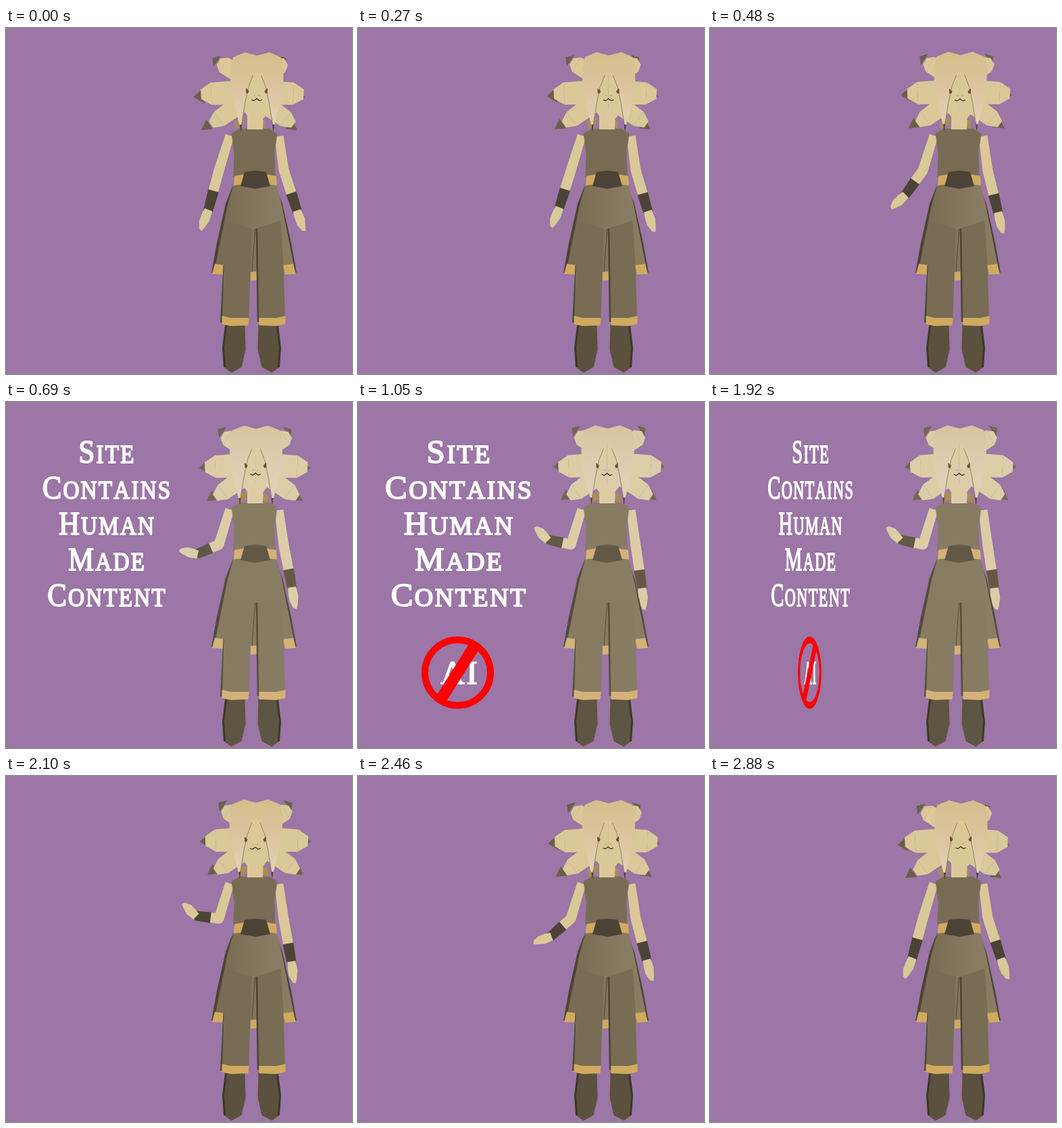
These frames come from a looping animation (512 by 512 pixels, 2910 ms). An HTML page with a canvas:

```html
<!DOCTYPE html>
<html lang="en">
<head>
<meta charset="utf-8">
<title>Human made</title>
<style>
html, body { margin: 0; width: 100%; height: 100%; overflow: hidden; background: #9b76a6; }
canvas { display: block; width: 100vw; height: 100vh; }
</style>
</head>
<body>
<canvas id="stage" width="512" height="512"></canvas>
<script>
const ctx = document.getElementById('stage').getContext('2d');
const LOOP = 2910, STEP = 30, HOLD = [1050, 1800];
const FONT = '"Liberation Serif", "Times New Roman", serif';
const RAD = Math.PI / 180;

// Colours turn softer while the text is on stage
const RICH = {
  skin: '#dac898', tip: '#6b5f49', dark: '#4b4436', gold: '#cfaa5f', edge: '#4d4435',
  boot: '#5b513e', cloth: ['#796c54', '#8a7c62'], hair: ['#d5bf8c', '#dcc49f', '#e3d0b2']
};
const SOFT = {
  skin: '#dccda7', tip: '#71664f', dark: '#625945', gold: '#d3b376', edge: '#544b3b',
  boot: '#5e5643', cloth: ['#877b62', '#897d64'], hair: ['#d6c5a0', '#dfccae', '#e2d0b7']
};
let tone = RICH;

const ease = x => { x = Math.min(1, Math.max(0, x)); return x * x * (3 - 2 * x); };
const ramp = (t, a, b) => ease((t - a) / (b - a));
const pulse = (t, a, b, c, d) => ramp(t, a, b) - ramp(t, c, d);

function trace(p) {
  ctx.beginPath();
  for (let i = 0; i < p.length; i += 2) ctx.lineTo(p[i], p[i + 1]);
}

function poly(fill, ...p) {
  trace(p);
  ctx.fillStyle = fill;
  ctx.fill();
}

function line(color, width, ...p) {
  trace(p);
  ctx.strokeStyle = color;
  ctx.lineWidth = width;
  ctx.stroke();
}

function disc(fill, x, y, r) {
  ctx.beginPath();
  ctx.arc(x, y, r, 0, 2 * Math.PI);
  ctx.fillStyle = fill;
  ctx.fill();
}

function blend(x0, y0, x1, y1, colors) {
  const g = ctx.createLinearGradient(x0, y0, x1, y1);
  colors.forEach((c, i) => g.addColorStop(i / (colors.length - 1), c));
  return g;
}

function at(x, y, turn, draw) {
  ctx.save();
  ctx.translate(x, y);
  ctx.rotate(turn);
  draw();
  ctx.restore();
}

// Draws a half shape on both sides of an axis; x counts outward
function both(axis, dy, draw) {
  for (const side of [-1, 1]) {
    ctx.save();
    ctx.translate(axis, dy);
    ctx.scale(side, 1);
    draw();
    ctx.restore();
  }
}

// Strip from one point to another with a width at each end
function taper(fill, x0, y0, w0, x1, y1, w1) {
  const d = Math.hypot(x1 - x0, y1 - y0) * 2;
  const nx = (y0 - y1) / d, ny = (x1 - x0) / d;
  poly(fill, x0 + nx * w0, y0 + ny * w0, x1 + nx * w1, y1 + ny * w1,
    x1 - nx * w1, y1 - ny * w1, x0 - nx * w0, y0 - ny * w0);
}

function spike(x0, y0, x1, y1, w) {
  const k = 0.78;
  taper(tone.tip, x0 + (x1 - x0) * k, y0 + (y1 - y0) * k, w, x1, y1, 0);
}

function leaf(x0, y0, x1, y1, w) {
  const mx = x0 + (x1 - x0) * 0.75, my = y0 + (y1 - y0) * 0.75;
  taper(tone.skin, x0, y0, w, mx, my, w * 0.92);
  taper(tone.skin, mx, my, w * 0.92, x1, y1, w * 0.4);
}

// Deeper layers move further to the right as the head turns
function petals(s) {
  both(360 + 11 * s, -6 * s, () => {
    spike(15, 95, 82.5, 102, 22);
    spike(15, 112, 71, 151, 17);
    spike(22, 66, 54.5, 44.5, 20);
  });
  both(364.5 + 8 * s, -2 * s, () => {
    leaf(15, 95, 76, 98, 36);
    leaf(15, 110, 61, 143, 28);
    leaf(20, 68, 50, 50, 27);
  });
}

function head(s) {
  both(361 + 6 * s, 0, () => poly('#a88d57', 8, 131, 23, 138, 22, 149, 10, 144));
  poly(tone.skin, 357, 120, 381, 120, 380, 150, 357, 150);
  both(371 - 2.5 * s, s, () => poly(tone.skin, 0, 62, 26, 62, 23, 118, 11, 133, 0, 133));
  both(371.5 - 2 * s, -1.5 * s, () => {
    taper(tone.edge, 24, 138, 4, 24, 152, 1);
    poly(blend(0, 38, 0, 142, tone.hair), -0.5, 41, 18, 36, 35, 43, 39, 56, 39, 80,
      36, 105, 26, 143, 23, 143, 18, 112, 13, 88, 6, 70, -0.5, 64);
    line('#8b7a5c', 0.9, 6, 70, 13, 88, 18, 112, 23, 143);
  });
  both(371 - 2.5 * s, s, () => {
    poly('#65503c', 16, 89, 11.5, 93, 13, 97, 16, 96);
    line('#382c20', 1.2, -0.3, 104.3, 4, 107.5, 7.8, 106.2);
    disc('#9a8060', 3.5, 100, 0.8);
  });
}

function hand(len) {
  poly(tone.skin, -6, -2, 6, -2, 7, len * 0.4, 4, len * 0.8, 1.5, len,
    -3, len * 0.93, -7, len * 0.6, -7, len * 0.25);
}

function arm(sx, sy, ex, ey, turn, near, far, wrist, len) {
  taper(tone.skin, sx, sy, 13, ex, ey, 15);
  disc(tone.skin, ex, ey, 7.4);
  at(ex, ey, turn * RAD, () => {
    taper(tone.skin, 0, 0, 15, 0, near + 1, 15);
    taper(tone.dark, 0, near, 16, 0, far, 14);
    at(0, far, (wrist - turn) * RAD, () => hand(len));
  });
}

function arms(sway, wave) {
  // The waving forearm shortens as it points at the viewer
  const fore = wave * (1 - 0.6 * wave);
  arm(331, 159, 315, 211, 15 + 87 * wave ** 1.2, 31 - 46 * fore, 62 - 65 * fore,
    21 + 115 * ease(wave), 31 - 12 * fore);
  arm(404, 160, 411, 210 + 3 * sway, 9.5 * sway - 18, 36, 65, 14 * sway - 20, 31);
}

function body() {
  const cloth = blend(322, 0, 398, 0, tone.cloth);
  both(363.5, 0, () => {
    poly(tone.boot, 10, 438, 38, 438, 43, 472, 41, 502, 30, 510, 15, 502, 9, 476);
    line('#3d372c', 3, 38, 440, 42, 473, 40, 502);
  });

  // Skirt
  both(367, 0, () => poly(tone.edge, 31, 232, 42, 260, 55, 318, 63, 362, 46, 364));
  poly(cloth, 337, 231, 400, 230, 408, 262, 426, 352, 372, 362, 363, 362, 310, 351, 328, 262);
  both(367, 0, () => poly(tone.gold, 43, 351, 58, 349, 62, 364, 46, 365));
  poly(tone.gold, 362, 361, 373, 360, 372, 373, 362, 374);

  // Trousers
  line(tone.edge, 5, 324, 351, 319.5, 436);
  both(366.5, 0, () => {
    poly(cloth, 3, 297, 40, 285, 44, 350, 46.5, 430, 7, 430);
    poly(tone.gold, 7, 429, 34, 429, 47, 426, 47, 438, 34, 441, 8, 440);
  });
  line(tone.edge, 2.5, 371, 297, 373, 435);
  line(tone.edge, 0.9, 371, 297, 368.5, 298, 364, 360);

  // Torso and belt
  both(367.5, 0, () => poly(cloth, -0.5, 149, 22, 149, 34, 156, 30, 185, 31, 221, -0.5, 223));
  both(369, 0, () => {
    poly(tone.gold, 13, 216, 31, 219, 32, 233, 16, 231);
    poly(tone.dark, -0.5, 211, 16, 213, 22, 234, -0.5, 238);
  });
}

// Capitals throughout, lower case letters set smaller
function caption(word, cx, base) {
  const gap = 2.5;
  let width = -gap;
  const glyphs = [...word].map(c => {
    const ch = c.toUpperCase(), font = (c === ch ? 49 : 38) + 'px ' + FONT, x = width + gap;
    ctx.font = font;
    width = x + ctx.measureText(ch).width;
    return { ch, font, x };
  });
  ctx.fillStyle = ctx.strokeStyle = '#fff';
  ctx.lineWidth = 1.9;
  ctx.lineJoin = 'round';
  for (const { ch, font, x } of glyphs) {
    ctx.font = font;
    ctx.fillText(ch, cx - width / 2 + x, base);
    ctx.strokeText(ch, cx - width / 2 + x, base);
  }
}

// Flip open about a vertical axis
function flip(cx, k, draw) {
  if (k < 0.005) return;
  ctx.save();
  ctx.translate(cx, 0);
  ctx.scale(k, 1);
  draw();
  ctx.restore();
}

function slogan() {
  ['Site', 'Contains', 'Human', 'Made', 'Content'].forEach((w, i) => caption(w, 0, 90 + i * 53));
}

function sign() {
  caption('AI', 2, 417);
  line('#f00', 17, -25, 440, 25, 361);
  ctx.beginPath();
  ctx.arc(0, 400.5, 48.5, 0, 2 * Math.PI);
  ctx.lineWidth = 10;
  ctx.stroke();
}

function render(t) {
  if (t < HOLD[1]) t = Math.min(t, HOLD[0]);
  const sway = pulse(t, 0, 1050, 1800, 2880);
  const wave = pulse(t, 150, 1050, 1980, 2880);
  const text = pulse(t, 480, 750, 1800, 2070);
  const ban = pulse(t, 720, 990, 1753, 2023);
  tone = text > 0.005 ? SOFT : RICH;

  ctx.fillStyle = '#9b76a6';
  ctx.fillRect(0, 0, 512, 512);
  petals(sway);
  arms(sway, wave);
  body();
  head(sway);
  flip(148.5, text, slogan);
  flip(147.5, ban, sign);
}

function tick() {
  const t = performance.now() % LOOP;
  render(Math.floor(t / STEP) * STEP);
  requestAnimationFrame(tick);
}
tick();
</script>
</body>
</html>
```
